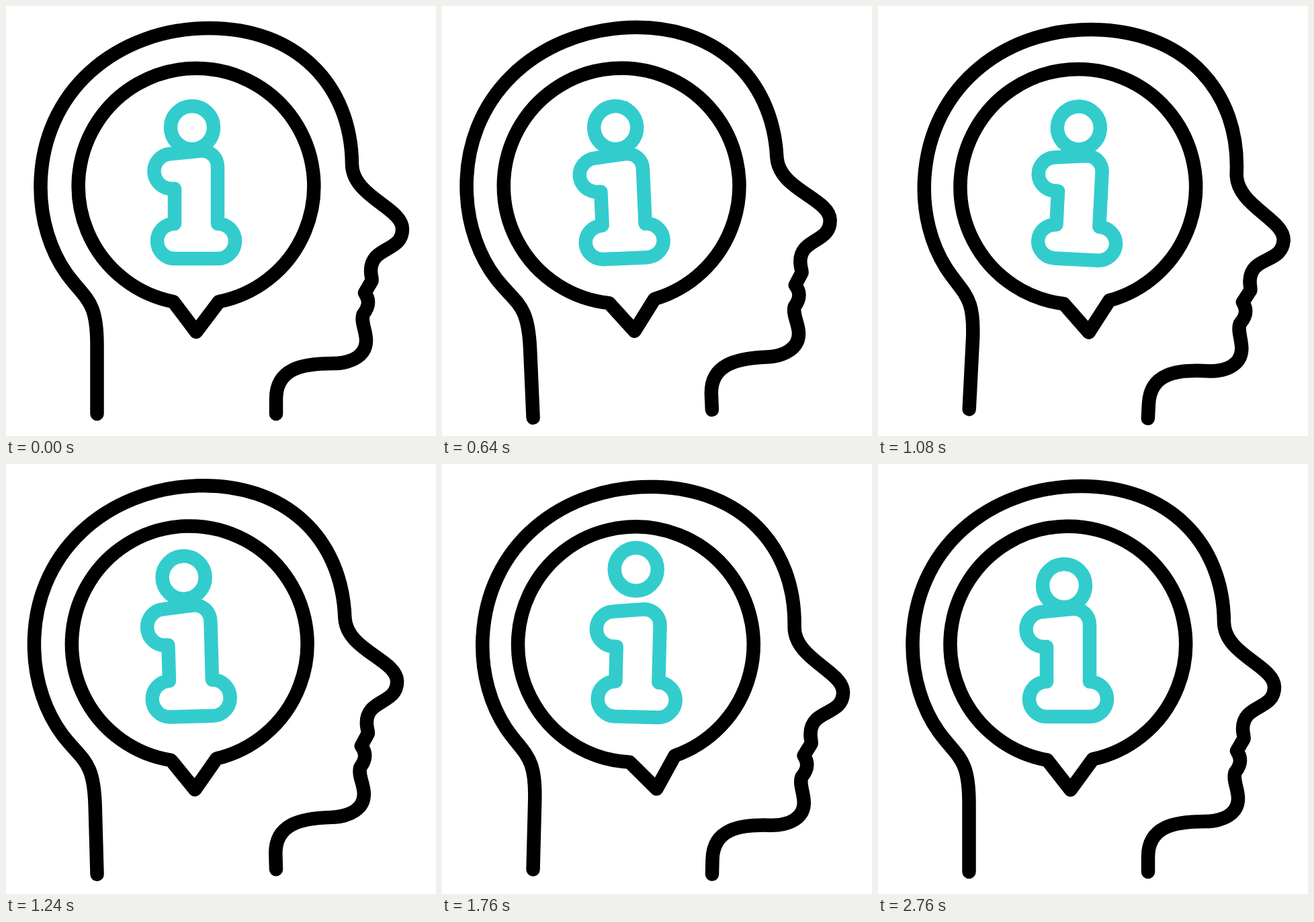
Recreate the animation shown at these times as an HTML page. Size 640 by 640 pixels, loop 2920 ms.

```html
<!DOCTYPE html>
<html lang="en">
<head>
<meta charset="utf-8">
<title>Head with info bubble</title>
<style>
  html, body { margin: 0; width: 100%; height: 100%; overflow: hidden; background: #fff; }
  svg { display: block; width: 100%; height: 100%; }
  path, circle { fill: none; stroke-width: 20.5; stroke-linecap: round; stroke-linejoin: round; }
  .ink { stroke: #000; }
  .teal { stroke: #33cccd; }
</style>
</head>
<body>
<svg viewBox="0 0 640 640">
  <g id="head">
    <path class="ink" d="M135.5 607V505C135.5 437 119 438 90 398C66 364 51.5 318 51.5 270
      C51.5 126 166 33 303 33C430 33 514 115 515 236C516 284 590 300 590 332
      C590 367 543 357 543 394C543 402 545 405 544.5 409L534 427
      C541 437 541 447 531.5 459C528 471 536 483 536 498
      C536 520 515 532 486 532C440 532 402 540 402 585V607"/>
    <path class="ink" id="bubble" d="M249 440A175.3 175.3 0 1 1 317 440L283 485Z"/>
    <path class="teal" id="stem"/>
    <circle class="teal" id="dot" cx="277" cy="181" r="32"/>
  </g>
</svg>
<script>
  const LOOP = 2920, STEP = 40, LAST = 2760;
  const el = id => document.getElementById(id);
  const head = el('head'), bubble = el('bubble'), stem = el('stem'), dot = el('dot');

  const clamp = u => Math.max(0, Math.min(1, u));
  const ease = u => (1 - Math.cos(Math.PI * clamp(u))) / 2;
  const ramp = (t, start, length) => ease((t - start) / length);
  const bump = (t, mid, half) => ease(1 - Math.abs(t - mid) / half);

  // Swing from 0 through the peaks and back; each beat is shorter by `shrink`.
  function swing(t, start, beat, shrink, peaks) {
    let value = 0;
    for (const peak of [...peaks, 0]) {
      if (t < start + beat) return value + (peak - value) * ramp(t, start, beat);
      start += beat;
      beat *= shrink;
      value = peak;
    }
    return 0;
  }

  // Outline of the letter, its height scaled from the base line.
  function stemPath(s) {
    const base = 376, y = h => base - h * s, arc = `A26 ${26 * s} 0 0 1`;
    return `M251 ${y(104)}H248${arc} 245 ${y(156)}L290 ${y(160.5)}` +
      `C304 ${y(161)} 315 ${y(151)} 315 ${y(136)}V${y(52)}` +
      `${arc} 315 ${base}H251${arc} 251 ${y(52)}Z`;
  }

  const set = (node, value) => node.setAttribute('transform', value);

  function draw(ms) {
    const t = Math.min(Math.floor((ms % LOOP) / STEP) * STEP, LAST);
    const tilt = swing(t, 40, 480, 0.885, [-4.25, 5.1, -2.45, 2.1]);
    const sway = swing(t, 0, 440, 1, [5.2, -13, 0.6, -9.7]);
    const spin = 360 * ramp(t, 2180, 600);
    const lift = 28 * (ramp(t, 1040, 440) - ramp(t, 1660, 440));
    const stretch = 1 - 0.127 * bump(t, 880, 360) + 0.03 * bump(t, 1240, 320);

    set(head, `rotate(${tilt} 268.5 607)`);
    set(bubble, `rotate(${sway} 283 288.6) rotate(${spin} 283 279.5)`);
    set(dot, `translate(0 ${-lift})`);
    stem.setAttribute('d', stemPath(stretch));
  }

  const start = performance.now();
  function tick() {
    draw(performance.now() - start);
    requestAnimationFrame(tick);
  }
  tick();
</script>
</body>
</html>
```
